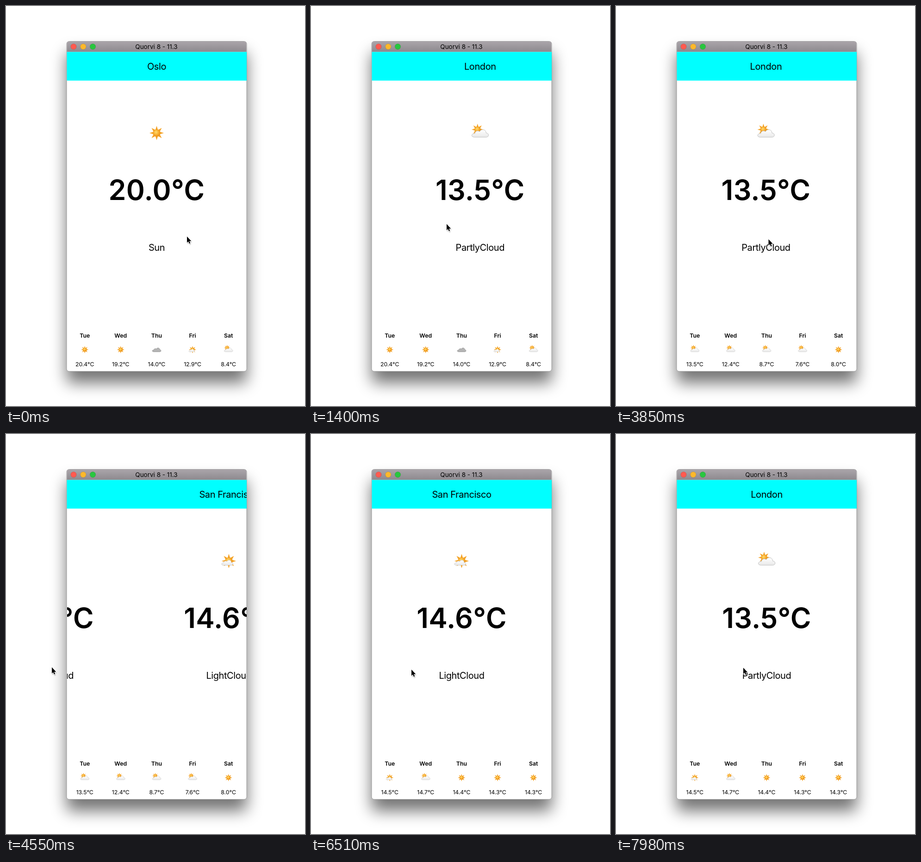
Recreate the animation shown at these times as an HTML page. Size 646x866 px, loop 8000 ms.

```html
<!DOCTYPE html>
<html lang="en">
<head>
<meta charset="utf-8">
<title>Weather pager</title>
<style>
  html, body { margin: 0; width: 100%; height: 100%; overflow: hidden; background: #fff; }
  svg { display: block; width: 646px; height: 866px; }
  text { font-family: Inter, Roboto, sans-serif; font-optical-sizing: none; text-anchor: middle; }
  .label { font-size: 20px; letter-spacing: -.42px; }
  .temp { font-size: 60.8px; font-weight: 600; letter-spacing: .35px; }
  .day { font-size: 12.3px; font-weight: 600; }
  .small { font-size: 12.3px; letter-spacing: -.05px; }
  .title { font-size: 13.5px; }
</style>
</head>
<body>
<svg viewBox="0 0 646 866">
  <defs>
    <filter id="blur" x="-30%" y="-30%" width="160%" height="160%"><feGaussianBlur stdDeviation="17"/></filter>
    <filter id="soft" x="-50%" y="-50%" width="200%" height="200%"><feGaussianBlur stdDeviation="1"/></filter>
    <linearGradient id="bar" x2="0" y2="1"><stop stop-color="#aaa5aa"/><stop offset="1" stop-color="#8d898e"/></linearGradient>
    <radialGradient id="disc" cx=".42" cy=".38" r=".65"><stop stop-color="#ffdc70"/><stop offset=".5" stop-color="#f9b437"/><stop offset="1" stop-color="#e98d15"/></radialGradient>
    <linearGradient id="white" x2="0" y2="1"><stop stop-color="#fff"/><stop offset="1" stop-color="#e9e9e9"/></linearGradient>
    <clipPath id="screen"><rect x="132" y="99" width="388" height="691"/></clipPath>
    <path id="cloud" d="M-12 9C-20 9 -20 1 -11 1C-11 -4 -5 -6 -1 -3C3 -10 13 -8 13 0C20 0 20 9 13 9Z"/>
    <path id="arrow" d="M0 0V13.6L3 10.7L5 15.4L7.2 14.4L5.2 9.9H9.3Z"/>
    <g id="sun">
      <path id="rays" fill="#f5a52b"/>
      <circle r="7.6" fill="url(#disc)" stroke="#e9951f" stroke-width=".6"/>
    </g>
    <g id="partly">
      <use href="#sun" transform="translate(-5.5 -7.5) scale(.82)"/>
      <use href="#cloud" fill="url(#white)" stroke="#b9b9b9" stroke-width=".9"/>
    </g>
    <g id="light">
      <use href="#sun"/>
      <use href="#cloud" transform="translate(-3.5 3) scale(.68)" fill="url(#white)" stroke="#bbb"/>
    </g>
    <use id="grey" href="#cloud" fill="#b4b4b4" stroke="#858585" stroke-width="1.3"/>
  </defs>

  <rect x="131" y="101" width="389" height="715" rx="6" opacity=".55" filter="url(#blur)"/>
  <rect x="131" y="76.5" width="389" height="714.5" rx="5.5" fill="#fff" stroke="#8a888a" stroke-width=".8"/>
  <path d="M131.5 99.5V82Q131.5 77 136.5 77H514.5Q519.5 77 519.5 82V99.5Z" fill="url(#bar)"/>
  <g stroke-opacity=".2" stroke="#000" stroke-width=".6">
    <circle cx="146" cy="88" r="6.2" fill="#ff5a50"/>
    <circle cx="166.8" cy="88" r="6.2" fill="#fdb82b"/>
    <circle cx="187.5" cy="88" r="6.2" fill="#28c63f"/>
  </g>
  <text class="title" x="325" y="93">Quorvi 8 - 11.3</text>

  <rect x="131.5" y="99.5" width="388.5" height="62" fill="#0ff"/>
  <g clip-path="url(#screen)"><g id="pages"></g></g>
  <g id="forecast"></g>
  <g id="cursor">
    <use href="#arrow" x="1" y="2.5" opacity=".4" filter="url(#soft)"/>
    <use href="#arrow" stroke="#fff" stroke-width="2" stroke-linejoin="round"/>
    <use href="#arrow"/>
  </g>
</svg>
<script>
const LOOP = 8000, TICK = 70, PAGE = 388, CENTER = 325.5;
const FORECAST_DELAY = 1120;
const $ = id => document.getElementById(id);

const days = ['Tue', 'Wed', 'Thu', 'Fri', 'Sat'];
const cities = [
  { name: 'Oslo', sky: 'sun', temp: '20.0', label: 'Sun',
    icons: 'sun sun grey light partly', temps: '20.4 19.2 14.0 12.9 8.4' },
  { name: 'London', sky: 'partly', temp: '13.5', label: 'PartlyCloud',
    icons: 'partly partly partly partly sun', temps: '13.5 12.4 8.7 7.6 8.0' },
  { name: 'San Francisco', sky: 'light', temp: '14.6', label: 'LightCloud',
    icons: 'light partly sun sun sun', temps: '14.5 14.7 14.4 14.3 14.3' },
];

const home = { x: 391, y: 499 };
const moves = [
  { from: 0, to: 490, x: 249, y: 474 },
  { from: 560, to: 910, x: 442, y: 474 },
  { from: 980, to: 1330, x: 293, y: 472 },
  { from: 1610, to: 2240, x: 383, y: 481 },
  { from: 2380, to: 2940, x: 407, y: 505 },
  { from: 3500, to: 4060, x: 283, y: 505 },
  { from: 4130, to: 4550, x: 99, y: 505 },
  { from: 4900, to: 5250, x: 246, y: 504 },
  { from: 6160, to: 6510, x: 217, y: 510 },
  { from: 6650, to: 7000, x: 396, y: 510 },
  { from: 7070, to: 7630, x: 284, y: 508 },
  { from: 7910, to: 7980, x: 275, y: 506 },
];

// The page follows the cursor until release, then glides to the next page.
const swipes = [
  { grab: 980, release: 1190, settle: 1540, page: 1 },
  { grab: 3843, release: 4550, settle: 4830, page: 2 },
  { grab: 6650, release: 6790, settle: 7230, page: 1 },
];

const clamp = v => Math.min(1, Math.max(0, v));
const mix = (a, b, k) => a + (b - a) * k;
const glide = k => 1 - (1 - k) ** 2.2;

function cursorAt(t) {
  return moves.reduce((p, { from, to, x, y }) => {
    const k = clamp((t - from) / (to - from));
    return { x: mix(p.x, x, k), y: mix(p.y, y, k) };
  }, home);
}

function scrollAt(t) {
  return swipes.reduce((offset, { grab, release, settle, page }) => {
    if (t < grab) return offset;
    const dragged = offset + cursorAt(grab).x - cursorAt(Math.min(t, release)).x;
    return mix(dragged, page * PAGE, glide(clamp((t - release) / (settle - release))));
  }, 0);
}

function forecastAt(t) {
  return swipes.reduce((page, s) => t >= s.settle + FORECAST_DELAY ? s.page : page, 0);
}

const text = (style, x, y, value) => `<text class="${style}" x="${x}" y="${y}">${value}</text>`;
const icon = (name, x, y, scale) => `<use href="#${name}" transform="translate(${x} ${y}) scale(${scale})"/>`;

function build() {
  const star = Array.from({ length: 16 }, (_, i) => {
    const r = i % 2 ? 7.4 : 15.6, a = i * Math.PI / 8;
    return `${(r * Math.sin(a)).toFixed(2)} ${(r * Math.cos(a)).toFixed(2)}`;
  });
  $('rays').setAttribute('d', `M${star.join('L')}Z`);

  $('pages').innerHTML = cities.map(({ name, sky, temp, label }, i) => {
    const x = CENTER + i * PAGE;
    return text('label', x, 138, name) + icon(sky, x, 275, 1) +
      text('temp', x, 420, temp + '°C') + text('label', x, 530, label);
  }).join('');

  $('forecast').innerHTML = cities.map(({ icons, temps }) => {
    const skies = icons.split(' '), values = temps.split(' ');
    const columns = days.map((day, i) => {
      const x = 170.2 + i * PAGE / 5;
      return text('day', x, 717.5, day) + icon(skies[i], x, 744, .52) + text('small', x, 779.7, values[i] + '°C');
    });
    return `<g>${columns.join('')}</g>`;
  }).join('');
}

function draw(time) {
  const t = Math.floor(time % LOOP / TICK) * TICK;
  const { x, y } = cursorAt(t);
  $('pages').setAttribute('transform', `translate(${-scrollAt(t)} 0)`);
  $('cursor').setAttribute('transform', `translate(${x} ${y})`);
  const current = forecastAt(t);
  [...$('forecast').children].forEach((group, i) => {
    group.setAttribute('visibility', i === current ? 'visible' : 'hidden');
  });
}

build();
const start = performance.now();
function frame() {
  draw(performance.now() - start);
  requestAnimationFrame(frame);
}
frame();
</script>
</body>
</html>
```
